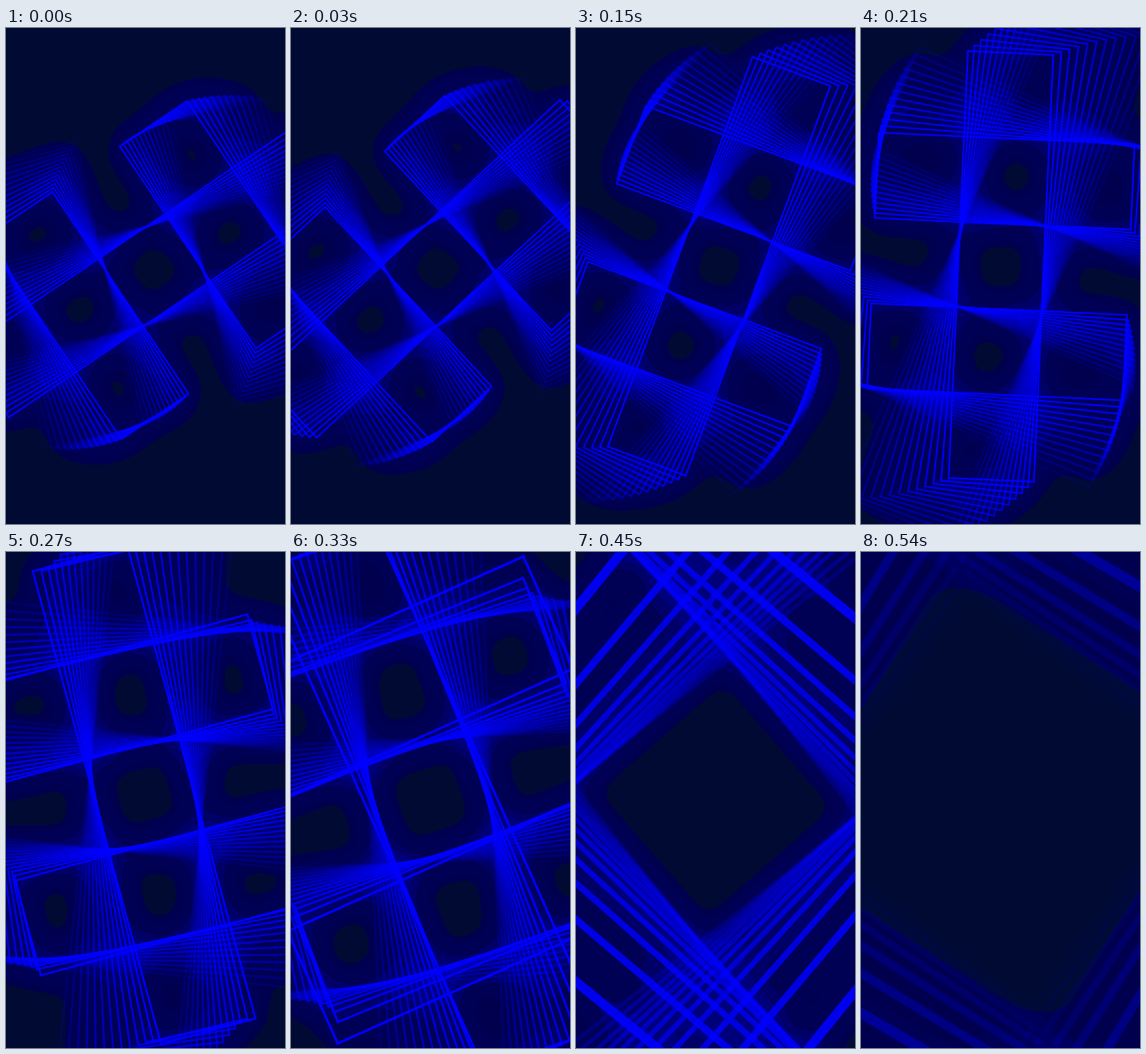
Recreate the animation shown at these times as an HTML page. Size 320 px wide and 568 px high, loop 570 ms.

```html
<!DOCTYPE html>
<html lang="en">
<head>
<meta charset="utf-8">
<title>Rotating grid</title>
<style>
  html, body { margin: 0; width: 100%; height: 100%; overflow: hidden; background: #000a32; }
  svg { display: block; width: 100vw; height: 100vh; }
</style>
</head>
<body>
<svg viewBox="0 0 320 568" preserveAspectRatio="xMidYMid slice">
  <defs>
    <!-- soft halo, cut into flat bands of blue -->
    <filter id="halo" filterUnits="userSpaceOnUse" x="-55" y="-55" width="430" height="678"
            color-interpolation-filters="sRGB">
      <feGaussianBlur stdDeviation="17"/>
      <feColorMatrix values="0 0 0 0 0  0 0 0 2 0  0 0 0 2 0  0 0 0 0 1"/>
      <feComponentTransfer>
        <feFuncG type="discrete" tableValues=".04 0 0 0 0 0 0 0 0 0"/>
        <feFuncB type="discrete" tableValues=".2 .31 .33 .33 .33 .4 .4 .48 .48 .48"/>
      </feComponentTransfer>
    </filter>
  </defs>
  <use href="#web" filter="url(#halo)"/>
  <g id="web" fill="none" stroke="#00f" stroke-width=".0205"></g>
</svg>
<script>
const LOOP = 570, SLOT = 30, COPIES = 13, TRAIL = 2.4;
const web = document.getElementById('web');

// seven unit squares touching at their corners
const cells = [[0, 0], [1, 1], [1, -1], [-1, 1], [-1, -1], [2, 0], [-2, 0]];
const shape = cells.map(([x, y]) => `M${x - .5} ${y - .5}h1v1h-1z`).join('');

const paths = Array.from({ length: COPIES }, () => {
  const path = document.createElementNS('http://www.w3.org/2000/svg', 'path');
  path.setAttribute('d', shape);
  web.prepend(path);
  return path;
});

const past = (step, mark) => Math.max(0, step - mark);

// steady turn that slows near the end
const angle = step => -34 - 8.9 * step + 3.3 * past(step, 11);

// the trail widens gently; a late burst throws the newest copies outwards
function size(step, k) {
  const age = k / (COPIES - 1);
  const base = (93 + .5 * step) * (1 + (.2 + .02 * step) * age);
  const burst = 3600 / (1 + Math.exp(1.05 * (13.2 - step)));
  const reach = Math.max(.7, .35 * (15 - step));
  return base + burst / (1 + k / reach);
}

// the trail dies away quickly in the last steps
const alpha = (step, k) => Math.pow(1 - k / COPIES, 1 - .03 * step + past(step, 13));

function draw(step) {
  const offset = 12 * Math.max(0, 1 - Math.pow(step / 9, 6));
  paths.forEach((path, k) => {
    const turn = angle(step - TRAIL * k / (COPIES - 1));
    path.setAttribute('transform',
      `translate(160 284) rotate(${turn}) translate(${offset} 0) scale(${size(step, k)})`);
    path.setAttribute('stroke-opacity', alpha(step, k));
  });
}

// every sixth slot holds the previous pose
function stepAt(ms) {
  const slot = Math.floor((ms % LOOP) / SLOT);
  return slot - Math.floor((slot + 2) / 6);
}

let start = null, shown = -1;
function tick(now) {
  if (start === null) start = now;
  const step = stepAt(Math.max(0, now - start));
  if (step !== shown) draw(shown = step);
  requestAnimationFrame(tick);
}
draw(0);
requestAnimationFrame(tick);
</script>
</body>
</html>
```
